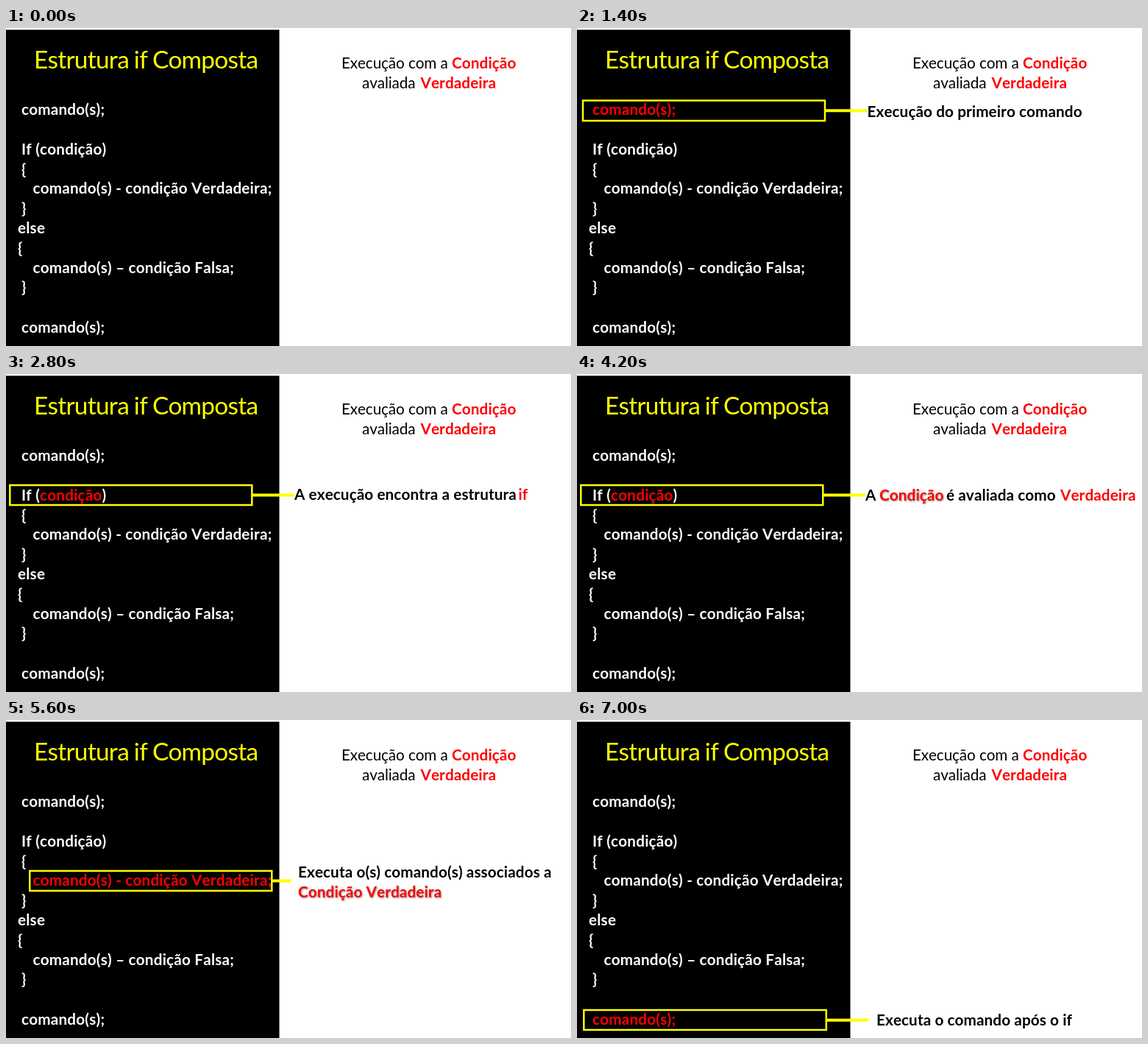
Animation, 768 px wide and 432 px high, one loop 8 s. Source, as an HTML page:

```html
<!DOCTYPE html>
<html lang="pt">
<head>
<meta charset="utf-8">
<title>Estrutura if Composta</title>
<style>
html, body { margin: 0; width: 100%; height: 100%; overflow: hidden; background: #fff; }
svg { display: block; width: 768px; height: 432px; }
text { font: 700 20.7px Lato, Carlito, sans-serif; font-kerning: none; letter-spacing: .1px; }
.title { font-size: 33.4px; font-weight: 400; fill: #ff0; letter-spacing: -.75px; word-spacing: -1px; }
.code text { fill: #fff; letter-spacing: .2px; }
.plain { font-weight: 400; letter-spacing: -.1px; }
.red { fill: #f00; }
.shade { filter: drop-shadow(1px 1px 1px #0007); }
.box, .link { fill: none; stroke: #ff0; stroke-width: 2.5; }
.link { stroke-width: 4; }

/* hard cuts every 1.4 s */
.step, .code .hot { animation: 8s step-end infinite; }
.step { visibility: hidden; }
.step.first { animation-name: show-first; }
.step.meet { animation-name: show-meet; }
.step.test { animation-name: show-test; }
.step.cond { animation-name: show-cond; }
.step.run { animation-name: show-run; }
.step.last { animation-name: show-last; }
.code .first { animation-name: red-first; }
.code .cond { animation-name: red-cond; }
.code .run { animation-name: red-run; }
.code .last { animation-name: red-last; }
@keyframes show-first { 17.5% { visibility: visible } 35% { visibility: hidden } }
@keyframes show-meet { 35% { visibility: visible } 52.5% { visibility: hidden } }
@keyframes show-test { 52.5% { visibility: visible } 70% { visibility: hidden } }
@keyframes show-cond { 35% { visibility: visible } 70% { visibility: hidden } }
@keyframes show-run { 70% { visibility: visible } 87.5% { visibility: hidden } }
@keyframes show-last { 87.5%, 100% { visibility: visible } }
@keyframes red-first { 17.5% { fill: #f00 } 35% { fill: #fff } }
@keyframes red-cond { 35% { fill: #f00 } 70% { fill: #fff } }
@keyframes red-run { 70% { fill: #f00 } 87.5% { fill: #fff } }
@keyframes red-last { 87.5%, 100% { fill: #f00 } }
</style>
</head>
<body>
<svg viewBox="0 0 768 432">
  <rect y="2.4" width="371.5" height="430"/>
  <text class="title" x="38" y="55">Estrutura if Composta</text>

  <g class="code">
    <text class="hot first" x="21" y="117.5">comando(s);</text>
    <text x="21" y="171.5">If (<tspan class="hot cond">condição</tspan>)</text>
    <text x="21" y="198.5">{</text>
    <text class="hot run" x="36.5" y="225">comando(s) - condição Verdadeira;</text>
    <text x="21" y="252">}</text>
    <text x="16" y="279">else</text>
    <text x="16" y="306">{</text>
    <text x="36.5" y="333">comando(s) – condição Falsa;</text>
    <text x="21" y="359">}</text>
    <text class="hot last" x="21" y="413.5">comando(s);</text>
  </g>

  <text class="plain" x="456" y="55">Execução com a</text>
  <text class="red" x="606" y="55">Condição</text>
  <text class="plain" x="484" y="82">avaliada</text>
  <text class="red" x="563.5" y="82">Verdadeira</text>

  <g class="step first">
    <rect class="box" x="8" y="98.5" width="329" height="27.5"/>
    <path class="link" d="M338 112.3H394"/>
    <text x="394.5" y="121">Execução do primeiro comando</text>
  </g>
  <g class="step cond">
    <rect class="box" x="5.3" y="151" width="329" height="27"/>
    <path class="link" d="M335 164.5H392"/>
  </g>
  <g class="step meet">
    <text x="392" y="171">A execução encontra a estrutura</text>
    <text class="red" x="696.5" y="171">if</text>
  </g>
  <g class="step test">
    <text x="392" y="172">A</text>
    <text class="red shade" x="411" y="172">Condição</text>
    <text x="502" y="172">é avaliada como</text>
    <text class="red" x="657" y="172">Verdadeira</text>
  </g>
  <g class="step run">
    <rect class="box" x="32.3" y="205" width="329" height="27"/>
    <path class="link" d="M362 218.5H388"/>
    <text x="397" y="213.5">Executa o(s) comando(s) associados a</text>
    <text class="red shade" x="397" y="240.5">Condição Verdadeira</text>
  </g>
  <g class="step last">
    <rect class="box" x="9.3" y="394" width="329.5" height="27"/>
    <path class="link" d="M340 407.7H396"/>
    <text x="407" y="415">Executa o comando após o if</text>
  </g>
</svg>
</body>
</html>
```
